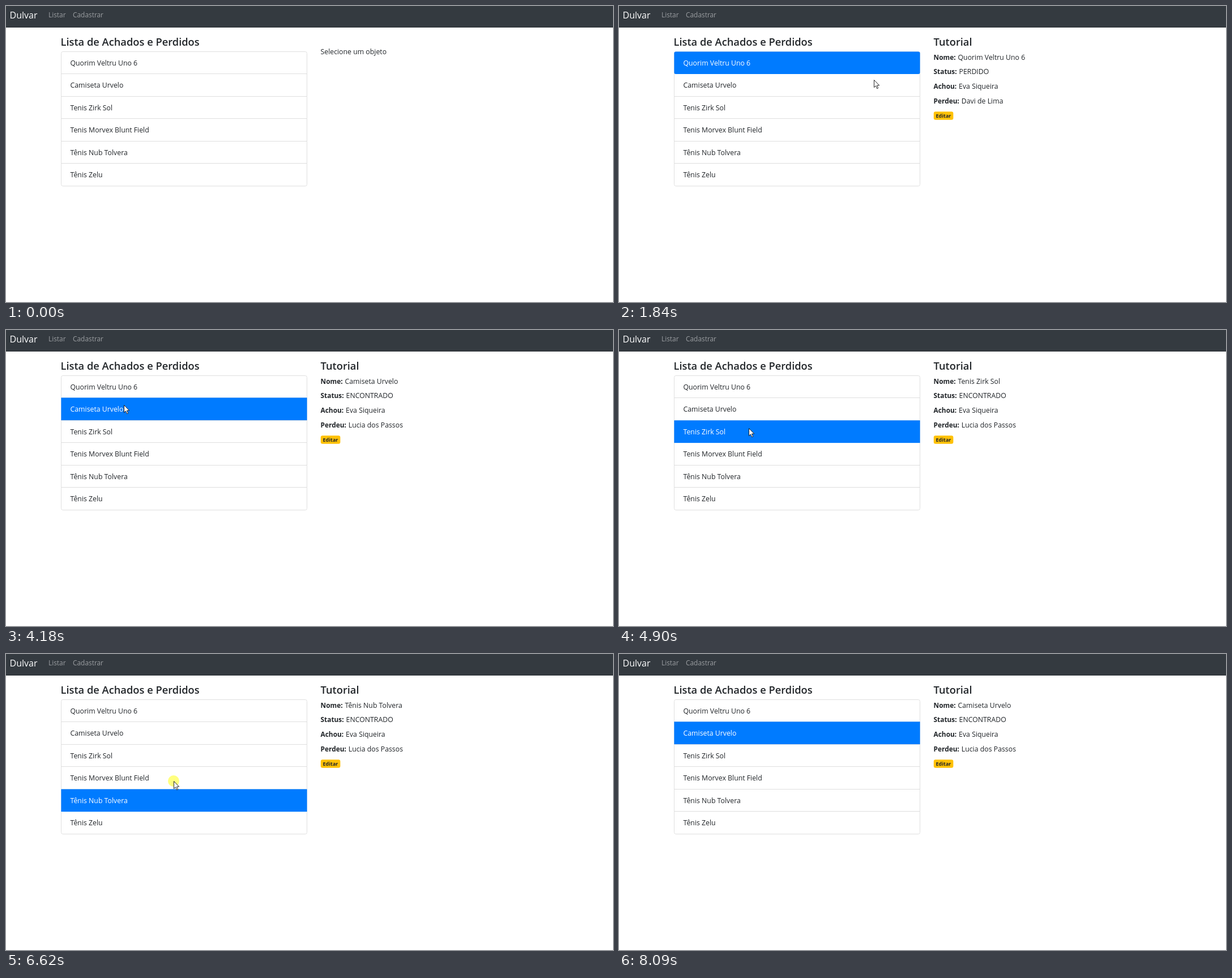
An HTML page for the animation above (9190 ms loop, 1072 px wide and 522 px high).

```html
<!DOCTYPE html>
<html lang="pt-BR">
<head>
<meta charset="utf-8">
<title>Achados e Perdidos</title>
<style>
  html, body { margin: 0; width: 100%; height: 100%; overflow: hidden; background: #fff; }
  svg { display: block; width: 1072px; height: 522px; }
  text { font: 12.3px "Open Sans", "Noto Sans", sans-serif; fill: #212529; white-space: pre; }
  .title { font-size: 18.3px; font-weight: 600; }
  .key { font-size: 11.9px; font-weight: 700; }
  .brand { font-size: 16px; fill: #fff; }
  .link { font-size: 11.9px; fill: #9a9da0; }
  .badge { font-size: 9px; font-weight: 700; }
</style>
</head>
<body>
<svg id="stage" viewBox="0 0 1072 522"></svg>
<script>
const LOOP = 9190;
const STEP = 76.5; // time between pointer redraws
const LIST = { left: 97, right: 532, top: 80, row: 39.5 };
const INFO = { left: 555.5, top: 90, line: 25.8 };
const stage = document.getElementById('stage');

const items = [
  'Quorim Veltru Uno 6', 'Camiseta Urvelo', 'Tenis Zirk Sol',
  'Tenis Morvex Blunt Field', 'Tênis Nub Tolvera', 'Tênis Zelu'
];

// Each move glides from the previous point to (x, y)
const entry = { x: 968, y: 502 };
const moves = [
  { from: 350, to: 1200, x: 291, y: 95 },
  { from: 1600, to: 1840, x: 450, y: 130 },
  { from: 1840, to: 2560, x: 633, y: 113 },
  { from: 2620, to: 2860, x: 638, y: 142 },
  { from: 3010, to: 3950, x: 208, y: 132 },
  { from: 4250, to: 4650, x: 226, y: 168 },
  { from: 4820, to: 5580, x: 257, y: 218 },
  { from: 5750, to: 6070, x: 293, y: 255 },
  { from: 6390, to: 7230, x: 305, y: 143 },
  { from: 7390, to: 8050, x: 958, y: 470 }
];
const enter = 350;
const leave = 8085;
const presses = [1370, 3010, 4100, 4820, 5420, 6310, 6610, 6915, 7230];

function add(name, attrs, parent = stage) {
  const el = document.createElementNS('http://www.w3.org/2000/svg', name);
  for (const key in attrs) el.setAttribute(key, attrs[key]);
  parent.appendChild(el);
  return el;
}

function label(x, y, content, cls = '', parent = stage) {
  const el = add('text', { x, y, class: cls }, parent);
  el.textContent = content;
  return el;
}

function show(el, on) {
  el.style.display = on ? '' : 'none';
}

const rowTop = i => Math.floor(LIST.top + LIST.row * i);

add('rect', { width: 1072, height: 522, fill: '#fff' });
add('rect', { width: 1072, height: 38, fill: '#343a40' });
add('rect', { y: 37, width: 1072, height: 1, fill: '#2e3439' });
label(6.5, 21.5, 'Dulvar', 'brand');
label(75, 20.3, 'Listar', 'link');
label(118, 20.3, 'Cadastrar', 'link');
label(96.5, 70, 'Lista de Achados e Perdidos', 'title');

const width = LIST.right - LIST.left;
add('rect', {
  x: LIST.left + 0.5, y: LIST.top + 0.5, width: width - 1, height: LIST.row * items.length,
  rx: 3, fill: '#fff', stroke: '#dfdfdf'
});
items.slice(1).forEach((_, i) => {
  add('rect', { x: LIST.left, y: rowTop(i + 1), width, height: 1, fill: '#dfdfdf' });
});
const active = add('rect', { x: LIST.left + 0.4, width: width - 0.8, fill: '#007bff' });
const rows = items.map((name, i) => label(113.5, LIST.top + 24.6 + LIST.row * i, name));

const hint = label(INFO.left, 84.6, 'Selecione um objeto');
const detail = add('g', {});
label(INFO.left, 70, 'Tutorial', 'title', detail);
const values = ['Nome: ', 'Status: ', 'Achou: ', 'Perdeu: '].map((key, i) => {
  const line = label(INFO.left, INFO.top + 4.5 + INFO.line * i, '', '', detail);
  add('tspan', { class: 'key' }, line).textContent = key;
  return add('tspan', { dx: 0.8 }, line);
});
add('rect', { x: 555.8, y: 186.3, width: 34.6, height: 14.4, rx: 3.2, fill: '#ffc107' }, detail);
label(559.5, 197.3, 'Editar', 'badge', detail);

const pointer = add('g', {});
const halo = add('circle', { r: 10, fill: '#ff0', 'fill-opacity': 0.5 }, pointer);
const arrow = add('path', {
  d: 'M.5 .5V13.6L3.5 10.8L5.6 15.7L7.7 14.8L5.6 10H9.7Z',
  fill: '#fff', stroke: '#111', 'stroke-width': 0.9
}, pointer);
const beam = add('path', {
  d: 'M-3 -6.5H-1L0 -5.5L1 -6.5H3M0 -5.5V5.5M-3 6.5H-1L0 5.5L1 6.5H3',
  fill: 'none', stroke: '#444'
}, pointer);

function locate(t) {
  let start = entry;
  for (const move of moves) {
    if (t < move.from) break;
    if (t < move.to) {
      const held = Math.floor((t - move.from) / STEP) * STEP;
      const k = held / (move.to - move.from);
      return { x: start.x + (move.x - start.x) * k, y: start.y + (move.y - start.y) * k };
    }
    start = move;
  }
  return start;
}

// List row under the point, or -1
function rowAt({ x, y }) {
  const i = Math.floor((y - LIST.top) / LIST.row);
  return x < LIST.right && i < items.length ? i : -1;
}

function isOverText({ x, y }) {
  const line = Math.round((y - INFO.top) / INFO.line);
  const gap = Math.abs(y - INFO.top - line * INFO.line);
  return x > INFO.left && x < 700 && line >= 0 && line < values.length && gap < 7;
}

// A press takes effect one redraw later
function pickedAt(t) {
  const done = presses.filter(at => t >= at + STEP).map(at => rowAt(locate(at)));
  return done.filter(row => row >= 0).pop() ?? -1;
}

function draw(time) {
  const t = time % LOOP + 1;
  const picked = pickedAt(t);
  const chosen = picked >= 0;

  show(hint, !chosen);
  show(detail, chosen);
  show(active, chosen);
  rows.forEach((el, i) => { el.style.fill = i === picked ? '#fff' : ''; });
  if (chosen) {
    const y = rowTop(picked) + 0.4;
    active.setAttribute('y', y);
    active.setAttribute('height', Math.ceil(LIST.top + LIST.row * (picked + 1)) - y + 0.1);
    active.setAttribute('rx', picked ? 0 : 3);
    const lost = picked === 0;
    const facts = [
      items[picked], lost ? 'PERDIDO' : 'ENCONTRADO',
      'Eva Siqueira', lost ? 'Davi de Lima' : 'Lucia dos Passos'
    ];
    values.forEach((el, i) => { el.textContent = facts[i]; });
  }

  const spot = locate(t);
  const overText = isOverText(spot);
  show(pointer, t >= enter && t < leave);
  pointer.setAttribute('transform', `translate(${Math.round(spot.x)} ${Math.round(spot.y)})`);
  show(halo, presses.some(at => t >= at && t < at + STEP));
  show(arrow, !overText);
  show(beam, overText);
}

const begin = performance.now();
function tick() {
  draw(performance.now() - begin);
  requestAnimationFrame(tick);
}
tick();
</script>
</body>
</html>
```
